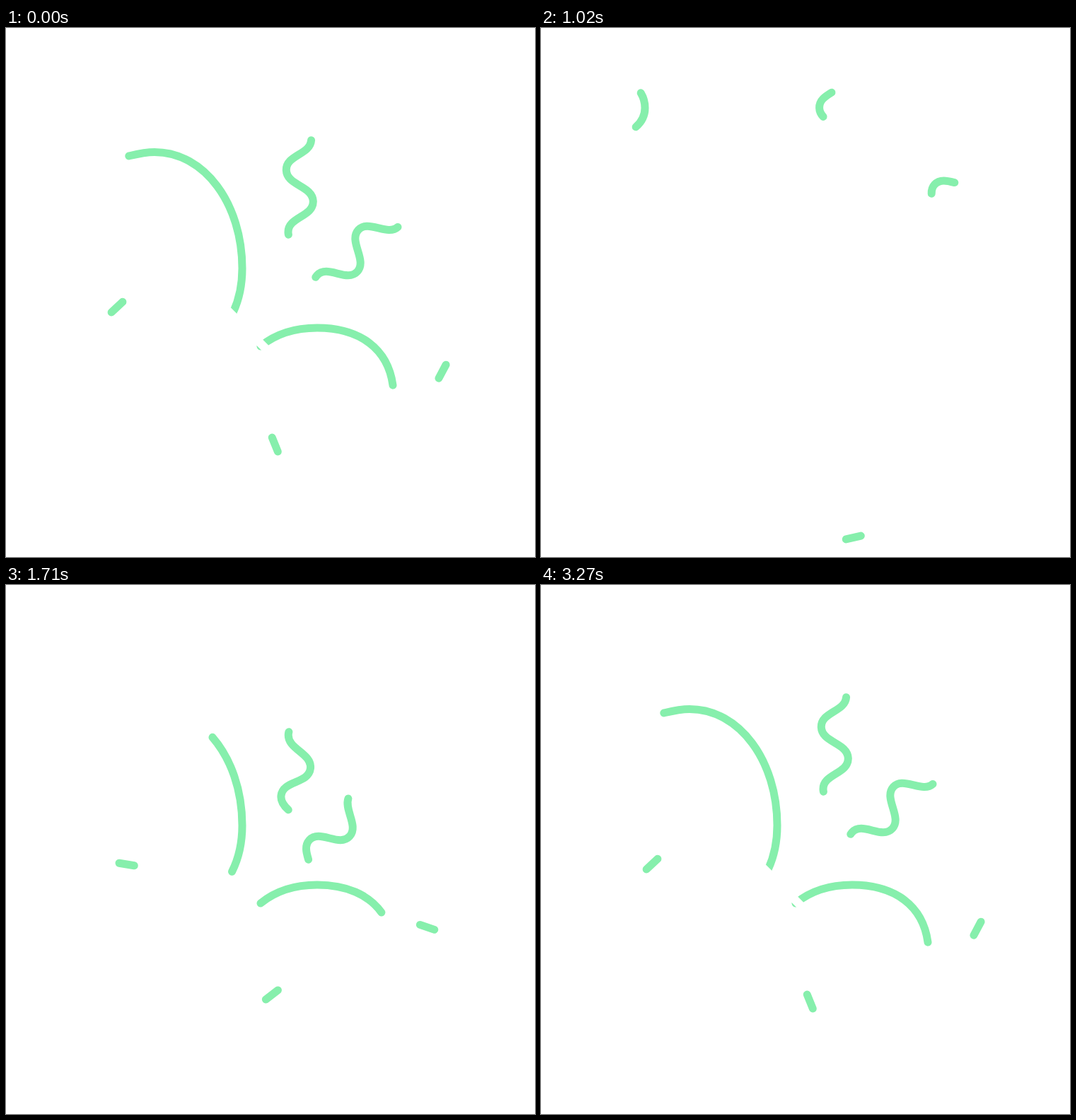
These frames come from a looping animation (748 px wide and 748 px high, 5330 ms). An HTML page:

```html
<!DOCTYPE html>
<html lang="en">
<head>
<meta charset="utf-8">
<title>Confetti burst</title>
<style>
  html, body { margin: 0; width: 100%; height: 100%; overflow: hidden; background: #fff; }
  svg { display: block; width: 100vw; height: 100vh; }
  path { fill: none; stroke: #86efac; stroke-width: 11; stroke-linecap: round; }
  #rim { stroke: #fff; stroke-width: 12; stroke-linecap: butt; }
</style>
</head>
<body>
<svg id="stage" viewBox="0 0 748 748">
  <path id="arcA" d="M311 420C327 396 334 370 334 340C334 249 281 175.5 210 175.5C182 175.5 165 187 130 187C85 187 53 164 53 130C53 96 70 70.5 100 70.5C126 70.5 147 88 147 113C147 138 122 152 95 155"/>
  <path id="arcB" d="M360 450C382 432 410 424 440 424C501 424 540 454 547 505C552 540 550 572 536 602C523 630 502 641 480 641C440 641 412 618 412 585C412 568 418 556 430 548"/>
  <path id="waveA"/>
  <path id="waveB"/>
  <path id="rim" d="M310 396L376 462"/>
</svg>
<script>
const LOOP = 5330, STEP = 30, REST = 3270;
const EXIT_END = 1140, LAUNCH = 1290, SETTLE = 2360, SAMPLE = 1470;
const stage = document.getElementById('stage');
const $ = id => document.getElementById(id);
const show = (el, on) => { el.style.display = on ? '' : 'none'; };

// Shows only the part of a path between two positions along it.
function trim(el, tail, head) {
  tail = Math.max(0, tail);
  const on = head > tail;
  show(el, on);
  if (!on) return;
  el.setAttribute('stroke-dasharray', `${head - tail} 2000`);
  el.setAttribute('stroke-dashoffset', -tail);
}

// Length along a path nearest to a point.
function locate(el, [x, y]) {
  let best = 0, least = Infinity;
  for (let s = 0, end = el.getTotalLength(); s <= end; s += 0.5) {
    const p = el.getPointAtLength(s);
    const d = Math.hypot(p.x - x, p.y - y);
    if (d < least) { least = d; best = s; }
  }
  return best;
}

function makeArc(id, o) {
  const el = $(id);
  const at = p => locate(el, p);
  const total = el.getTotalLength();
  const tail = at(o.tail), head = at(o.head);
  const outTail = at(o.outTail) - tail, outHead = at(o.outHead) - head;
  const grow = head - at(o.early);
  return t => {
    if (t >= REST) return trim(el, tail, head);
    if (t < LAUNCH) {
      const u = t / o.outTime;
      const end = Math.min(total, head + outHead * u ** 1.38);
      return trim(el, tail + outTail * u ** 1.54, t < EXIT_END ? end : 0);
    }
    const dt = t - SAMPLE;
    trim(el, tail - o.slip * Math.exp(-0.0046 * dt), head - grow * Math.exp(-o.rate * dt));
  };
}

// A wave through alternating crests a and b, one unit of length per half wave.
function makeWave(id, o) {
  const el = $(id);
  const [px, py] = o.period;
  const crest = i => {
    const k = Math.floor(i / 2), base = i % 2 ? o.b : o.a;
    return [base[0] + k * px, base[1] + k * py];
  };
  let [x, y] = crest(0), d = `M${x} ${y}`;
  for (let i = 1; i <= 7; i++) {
    const [nx, ny] = crest(i);
    d += `C${x + px / 4} ${y + py / 4} ${nx - px / 4} ${ny - py / 4} ${nx} ${ny}`;
    [x, y] = [nx, ny];
  }
  el.setAttribute('d', d);
  el.setAttribute('pathLength', 7);
  const tail = 1.95, head = 4.97;
  return t => {
    if (t < LAUNCH) {
      el.removeAttribute('transform');
      const u = t / 1020;
      return trim(el, tail + 3.83 * u ** 2.8, t < EXIT_END ? head + 1.53 * u ** 3 : 0);
    }
    const k = Math.max(0, (SETTLE - t) / (SETTLE - SAMPLE)), k3 = k ** 3;
    el.setAttribute('transform',
      `translate(${o.shift[0] * k3} ${o.shift[1] * k3}) rotate(${o.turn * k ** 2.2} 415 377)`);
    trim(el, tail - o.slip * k3, head - o.grow * k3);
  };
}

function makeDash(o) {
  const el = document.createElementNS(stage.namespaceURI, 'path');
  el.setAttribute('d', 'M-10.8 0H10.8');
  stage.insertBefore(el, $('rim'));
  return t => {
    let f, move, angle;
    if (t < LAUNCH) {
      f = 1 - (1 - Math.min(1, t / 1050)) ** 3;
      move = o.fly;
      angle = o.angle + o.spin * t;
    } else {
      const k = Math.max(0, (SETTLE - t) / (SETTLE - SAMPLE));
      f = k ** 3;
      move = o.from;
      angle = o.angle + o.turn * k ** 1.5;
    }
    show(el, t < o.gone || t >= 1320);
    el.setAttribute('transform',
      `translate(${o.at[0] + move[0] * f} ${o.at[1] + move[1] * f}) rotate(${angle})`);
  };
}

const parts = [
  makeArc('arcA', { tail: [322, 402], head: [174, 181], early: [333, 325], rate: 0.0027, slip: 12,
    outTime: 1020, outTail: [139.5, 92], outHead: [133.5, 138] }),
  makeArc('arcB', { tail: [360, 450], head: [547, 505], early: [472, 427], rate: 0.0039, slip: 0,
    outTime: 660, outTail: [536, 602], outHead: [458, 637] }),
  makeWave('waveA', { a: [401.7, 377], b: [437, 333], period: [-2.7, -88],
    shift: [-59.5, 26], turn: 17, slip: 0.87, grow: 2.36 }),
  makeWave('waveB', { a: [381.4, 413.9], b: [438.4, 408.6], period: [58.4, -64.2],
    shift: [-28, 28], turn: 0, slip: 1.08, grow: 2.75 }),
  makeDash({ at: [157, 394.7], angle: -43, fly: [-146, 146], spin: -0.287, gone: 780,
    from: [35, 0.8], turn: 84 }),
  makeDash({ at: [617, 485.7], angle: 118, fly: [119, -13], spin: 0.403, gone: 900,
    from: [-55, -4.7], turn: -159 }),
  makeDash({ at: [380.3, 589], angle: 68, fly: [61.5, 131.5], spin: 0.45, gone: 1080,
    from: [-11.3, -24.5], turn: -169 })
];

const start = performance.now();
function draw() {
  const now = (performance.now() - start) % LOOP;
  const t = Math.min(REST, Math.floor(now / STEP) * STEP);
  parts.forEach(part => part(t));
  show($('rim'), t < STEP || t >= REST);
  requestAnimationFrame(draw);
}
draw();
</script>
</body>
</html>
```
